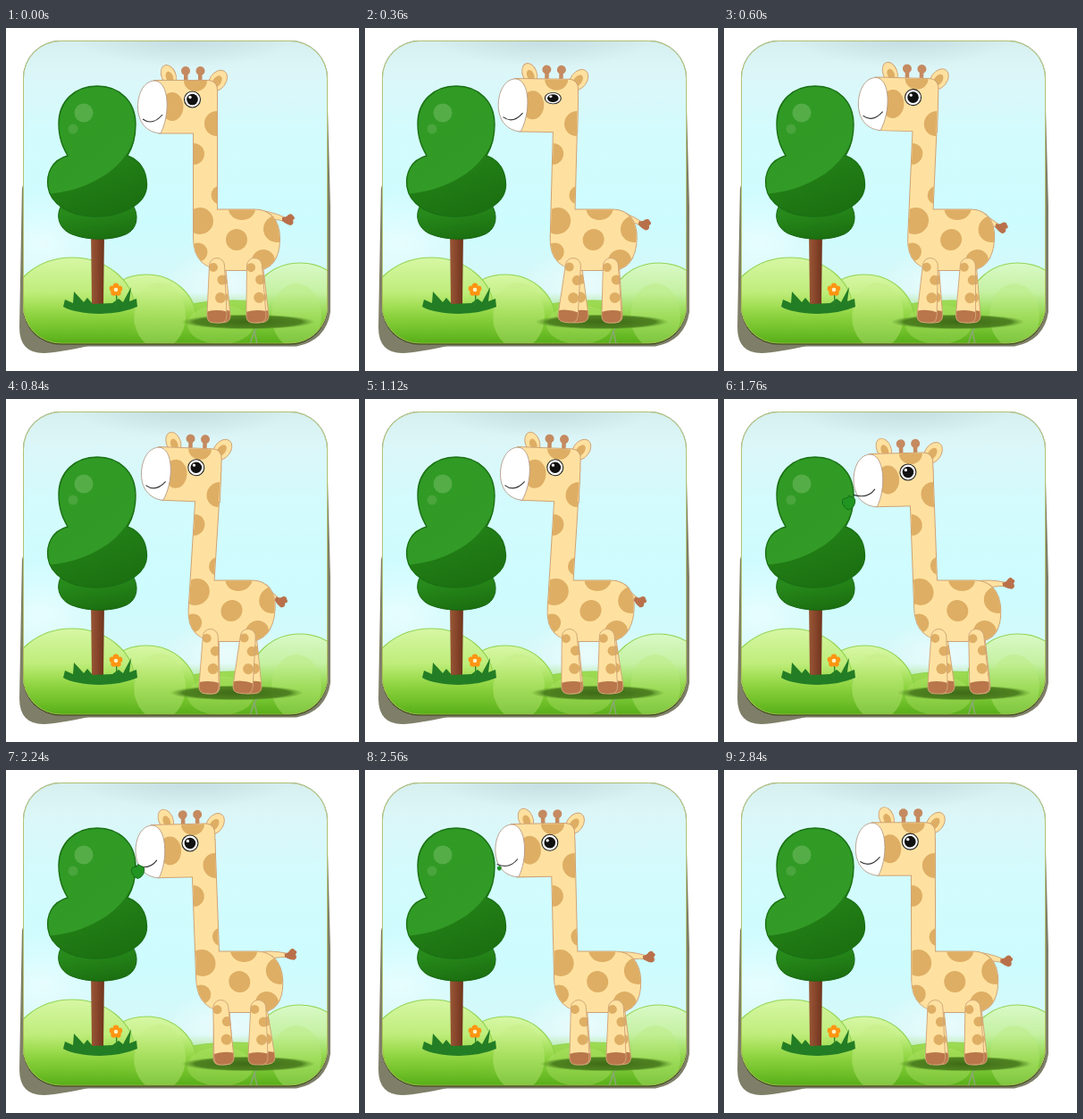
Animation of 395x384 px, one loop 2.88 s. Source, as an HTML page:

```html
<!DOCTYPE html>
<html lang="en">
<head>
<meta charset="utf-8">
<title>Giraffe and tree</title>
<style>
  html, body { margin: 0; width: 100%; height: 100%; overflow: hidden; background: #fff; }
  svg { display: block; width: 395px; height: 384px; }
  .skin { fill: #fee1a0; }
  .rim { fill: none; stroke: #cfa275; stroke-width: 2; }
  .spot { fill: #deae64; }
  .line { stroke: #cfa275; stroke-width: .9; }
  .hoof { fill: #b9764a; }
</style>
</head>
<body>
<svg viewBox="0 0 395 384">
  <defs>
    <linearGradient id="sky" x2="0" y2="1">
      <stop offset="0" stop-color="#d6efef"/><stop offset=".1" stop-color="#dcf6f8"/>
      <stop offset=".3" stop-color="#d3fbfd"/><stop offset=".6" stop-color="#cdfcff"/>
      <stop offset=".8" stop-color="#d6f8f8"/>
    </linearGradient>
    <radialGradient id="haze">
      <stop offset="0" stop-color="#bcd6da" stop-opacity=".8"/><stop offset="1" stop-color="#bcd6da" stop-opacity="0"/>
    </radialGradient>
    <radialGradient id="glow">
      <stop offset="0" stop-color="#fff" stop-opacity=".5"/><stop offset="1" stop-color="#fff" stop-opacity="0"/>
    </radialGradient>
    <linearGradient id="hill" x2="0" y2="1">
      <stop offset="0" stop-color="#d6f7a4"/><stop offset=".45" stop-color="#b6e96c"/><stop offset="1" stop-color="#6fc228"/>
    </linearGradient>
    <linearGradient id="paleHill" x2="0" y2="1">
      <stop offset="0" stop-color="#d8f9c6"/><stop offset=".5" stop-color="#b9ec8c"/><stop offset="1" stop-color="#7ecb40"/>
    </linearGradient>
    <linearGradient id="ground" x2="0" y2="1">
      <stop offset="0" stop-color="#8fd540" stop-opacity="0"/><stop offset=".45" stop-color="#80cc31" stop-opacity=".7"/>
      <stop offset="1" stop-color="#55ad17"/>
    </linearGradient>
    <linearGradient id="crown" x1=".2" y1="0" x2=".7" y2="1">
      <stop offset="0" stop-color="#2f9a24"/><stop offset="1" stop-color="#349b28"/>
    </linearGradient>
    <linearGradient id="crownShade" x1=".3" y1=".2" x2=".6" y2="1">
      <stop offset="0" stop-color="#278a1b"/><stop offset="1" stop-color="#1b6f10"/>
    </linearGradient>
    <linearGradient id="trunk">
      <stop offset="0" stop-color="#9a5a36"/><stop offset=".5" stop-color="#87452b"/><stop offset="1" stop-color="#6b3119"/>
    </linearGradient>
    <radialGradient id="shade">
      <stop offset="0" stop-color="#3f6a17"/><stop offset=".8" stop-color="#47791b" stop-opacity=".9"/>
      <stop offset="1" stop-color="#5c9a28" stop-opacity="0"/>
    </radialGradient>
    <clipPath id="cardClip"><rect x="19" y="14" width="341" height="339" rx="42"/></clipPath>
    <path id="crownShape" d="M102 65C77 65 59 82 59 107C59 124 64 134 69 143C51 148 45 163 47 178C50 198 72 210 97 211C126 212 158 199 157.500 175C157 159 149 148 136 143C142 133 145 123 145 108C145 82 127 65 102 65Z"/>
    <clipPath id="crownClip"><use href="#crownShape"/></clipPath>
    <path id="torso" d="M210 78H236V203.500H278C296 203.500 306 216 306 236C306 259 296 271 278 271H246C223 271 210 258 210 235Z"/>
    <clipPath id="torsoClip"><use href="#torso"/></clipPath>
    <path id="skull" d="M166 59H225Q236 59 236 70V117.500H172Z"/>
    <clipPath id="skullClip"><use href="#skull"/></clipPath>
    <path id="legShape" d="M-8.500 0A8.500 8.500 0 0 1 8.500 0L11 54Q12 64 3 64H-3Q-12 64 -11 54Z"/>
    <clipPath id="legClip"><use href="#legShape"/></clipPath>
    <g id="leg">
      <use href="#legShape" class="skin"/>
      <g clip-path="url(#legClip)">
        <g class="spot">
          <circle cx="-4" cy="2" r="5"/><circle cx="6" cy="16" r="5.500"/><circle cx="4" cy="36" r="6"/>
        </g>
        <path class="hoof" d="M-13 52Q0 48 13 52V65H-13Z"/>
      </g>
      <use href="#legShape" class="line" fill="none"/>
    </g>
  </defs>

  <!-- card -->
  <path d="M18 176L15 335Q15 364 42 364Q60 363 92 356L60 330Z" fill="#7f7f69"/>
  <path d="M360 90L363 200V318Q358 350 325 356.500H70L60 330H340Z" fill="#7f7f69"/>
  <rect x="19" y="14" width="341" height="340.500" rx="42" fill="#37451a"/>
  <g clip-path="url(#cardClip)">
    <rect x="19" y="14" width="341" height="340" fill="url(#sky)"/>
    <ellipse cx="200" cy="8" rx="125" ry="36" fill="url(#haze)"/>
    <ellipse cx="40" cy="240" rx="80" ry="60" fill="url(#glow)"/>
    <ellipse cx="245" cy="285" rx="70" ry="40" fill="url(#glow)"/>
    <g stroke="#93d555" stroke-width="1.200">
      <path d="M190 313Q235 301 290 307V360H190Z" fill="#a6de5e"/>
      <ellipse cx="329" cy="316" rx="57" ry="53" fill="url(#paleHill)"/>
      <ellipse cx="157" cy="327" rx="56" ry="51" fill="url(#hill)"/>
      <ellipse cx="74" cy="316" rx="70" ry="59" fill="url(#hill)"/>
    </g>
    <rect x="19" y="296" width="341" height="58" fill="url(#ground)"/>
    <ellipse cx="172" cy="322" rx="29" ry="37" fill="#c3ea83" opacity=".4"/>
    <ellipse cx="240" cy="332" rx="37" ry="22" fill="#b6e56f" opacity=".35"/>
    <ellipse cx="325" cy="322" rx="28" ry="36" fill="#b9e97c" opacity=".4"/>
    <path d="M273 354L278 339L285 331M278 339L281 354" fill="none" stroke="#89a873" stroke-width="1.500"/>
  </g>
  <rect x="19.500" y="14.500" width="340" height="338.500" rx="42" fill="none" stroke="#a8b34e" stroke-width=".8"/>

  <!-- tree -->
  <path d="M95 228H110L109 308L111 313H94L96 308Z" fill="url(#trunk)"/>
  <path d="M64 312L66 304L75 308L76 295L87 307L91 302L97 309L119 308L126 303L131 307L140 290L138 306L146 303L147 312Q130 319.500 105 320Q76 319 64 312Z" fill="#237d25"/>
  <path d="M123 297Q125 303 122 312" fill="none" stroke="#2c8327" stroke-width="1.300"/>
  <g id="flower" fill="#ff9512"></g>
  <circle cx="123" cy="293" r="2.300" fill="#fff2c2"/>
  <path d="M63 197C55 208 58 225 74 231C91 238 119 238 134 231C148 225 149 208 141 197Z" fill="url(#crownShade)" stroke="#17660f"/>
  <use href="#crownShape" fill="url(#crown)"/>
  <path d="M150 100Q142 148 105 168Q78 184 44 186V215H160V100Z" fill="url(#crownShade)" clip-path="url(#crownClip)"/>
  <use href="#crownShape" fill="none" stroke="#1a7014" stroke-width="1.400"/>
  <circle cx="87" cy="95" r="10.500" fill="#55ad47"/>
  <circle cx="75" cy="113" r="5.500" fill="#4aa53d"/>

  <!-- giraffe -->
  <ellipse id="shadow" cy="329" rx="75" ry="8.500" fill="url(#shade)"/>
  <g id="tail">
    <path d="M278 204Q294 204 312 212L311 216Q297 213 288 215Z" class="skin line"/>
    <path d="M309 212Q314 212 316 209Q320 207 321 210Q325 213 321 215Q323 220 318 221Q314 220 309 216Z" fill="#b9704a"/>
  </g>
  <use id="farFront" href="#leg"/>
  <use id="farBack" href="#leg"/>
  <g class="body"><use href="#torso" class="rim"/></g>
  <g class="head">
    <ellipse cx="182" cy="53" rx="8" ry="12" transform="rotate(-22 182 53)" class="skin line"/>
    <ellipse cx="183" cy="55" rx="4" ry="6.500" transform="rotate(-22 183 55)" class="spot"/>
    <ellipse cx="237" cy="59" rx="9" ry="13" transform="rotate(36 237 59)" class="skin line"/>
    <ellipse cx="236" cy="60" rx="4.500" ry="7.500" transform="rotate(36 236 60)" class="spot"/>
    <g fill="#c58a60">
      <rect x="199" y="48" width="4.500" height="13"/><circle cx="201" cy="48" r="5"/>
      <rect x="215" y="48" width="4.500" height="13"/><circle cx="217.500" cy="48" r="5"/>
    </g>
    <use href="#skull" class="rim"/>
  </g>
  <g class="body"><use href="#torso" class="skin"/></g>
  <g class="head">
    <use href="#skull" class="skin"/>
    <g class="spot" clip-path="url(#skullClip)">
      <ellipse cx="186" cy="88" rx="12.500" ry="16"/>
      <ellipse cx="212" cy="59" rx="13" ry="12"/>
    </g>
  </g>
  <g class="body">
    <g class="spot" clip-path="url(#torsoClip)">
      <circle cx="236" cy="107" r="14"/><circle cx="210" cy="141" r="12"/>
      <circle cx="240" cy="187" r="10.500"/><circle cx="217" cy="216" r="15"/>
      <ellipse cx="264" cy="202" rx="15" ry="13"/><circle cx="258" cy="237" r="12"/>
      <circle cx="303" cy="225" r="15"/><circle cx="215" cy="251" r="10.500"/>
      <circle cx="288" cy="261" r="13"/>
    </g>
  </g>
  <use id="nearFront" href="#leg"/>
  <use id="nearBack" href="#leg"/>
  <g class="head">
    <path d="M166 59C153 60 147.500 75 147.500 88C147.500 105 157 117 173 118C178 108 181 95 180 81C179 68 174 59 166 59Z" fill="#fff" stroke="#b59a86" stroke-width=".9"/>
    <path id="mouth" fill="none" stroke="#333" stroke-width="1.100"/>
    <g id="eye">
      <circle r="9" fill="#fff" stroke="#222" stroke-width="1.100"/>
      <circle r="6.300" fill="#111"/>
      <circle cx="-2.500" cy="-2.500" r="1.700" fill="#fff"/>
    </g>
  </g>
  <path id="leaf" d="M0 -8Q3 -6 4 -6Q8 -5 7 0Q6 6 0 8Q-6 6 -7 0Q-8 -5 -3 -5Q0 -5 0 -8Z" fill="#219522" stroke="#146c18" stroke-width="1"/>
</svg>
<script>
const LOOP = 2880, STEP = 40;
const $ = id => document.getElementById(id);
const transform = (el, value) => el.setAttribute('transform', value);
const heads = document.querySelectorAll('.head');
const bodies = document.querySelectorAll('.body');

$('flower').innerHTML = Array.from({ length: 5 }, (_, i) => {
  const a = (i * 72 - 90) * Math.PI / 180;
  return `<circle cx="${123 + 4.3 * Math.cos(a)}" cy="${293 + 4.3 * Math.sin(a)}" r="3.2"/>`;
}).join('');

// Linear interpolation through [time, value] keys.
function track(keys, t) {
  const i = keys.findIndex(key => key[0] > t);
  if (i < 0) return keys[keys.length - 1][1];
  if (i === 0) return keys[0][1];
  const [t0, a] = keys[i - 1], [t1, b] = keys[i];
  return a + (b - a) * (t - t0) / (t1 - t0);
}

// Lean: 1 is fully back, negative is stretched towards the tree.
const lean = [[0, 0], [840, 1], [1120, 1], [1720, -.6], [2400, -.6], [LOOP, 0]];
const blink = [[280, 1], [360, .7], [440, 1]];
const times = [0, 360, 840, 1400, 1760, 2240, LOOP];
const keyed = values => values.map((v, i) => [times[i], v]);
const shadowX = keyed([271, 265, 258, 263, 269, 271, 270]);
const legs = [
  { id: 'nearFront', hip: 236, foot: keyed([236, 227, 227, 235, 239, 244, 236]) },
  { id: 'farFront', hip: 237, foot: keyed([240, 239, 228, 238, 247, 243, 240]) },
  { id: 'nearBack', hip: 278, foot: keyed([280, 276, 265, 278, 286, 282, 280]) },
  { id: 'farBack', hip: 279, foot: keyed([283, 277, 275, 281, 287, 290, 283]) }
];
const leafX = [[1720, 139], [1760, 139.5], [2240, 147.5], [2640, 151]];
const leafY = [[1760, 116], [2240, 113.5], [2640, 109]];
const leafSize = [[2400, 1], [2640, 0]];

function draw(t) {
  const p = track(lean, t);
  for (const el of heads) transform(el, `translate(${4.3 * p} ${-3.3 * p}) rotate(${2.2 * p} 208 80)`);
  for (const el of bodies) transform(el, `matrix(1 0 ${-.062 * p} 1 ${9.2 * p} 0)`);
  transform($('tail'), `translate(${-3.5 * p} 0) rotate(${20 * p} 280 207)`);
  transform($('eye'), `translate(208.500 80) scale(1 ${track(blink, t)})`);

  for (const { id, hip, foot } of legs) {
    const x = hip - 7.2 * p;
    const angle = Math.atan2(x - track(foot, t), 57) * 180 / Math.PI;
    transform($(id), `translate(${x} 266) rotate(${angle})`);
  }
  $('shadow').setAttribute('cx', track(shadowX, t));

  const m = Math.max(0, -p / .6);
  $('mouth').setAttribute('d', `M${153 - 6 * m} ${102 + 2 * m}Q${164 - m} ${110 - m} ${175 - 4 * m} ${97 + m}`);

  const size = t < 1720 ? 0 : track(leafSize, t);
  $('leaf').style.display = size > 0 ? '' : 'none';
  transform($('leaf'), `translate(${track(leafX, t)} ${track(leafY, t)}) scale(${size})`);
}

const start = performance.now();
function tick() {
  const t = (performance.now() - start) % LOOP;
  draw(Math.floor(t / STEP) * STEP);
  requestAnimationFrame(tick);
}
tick();
</script>
</body>
</html>
```
